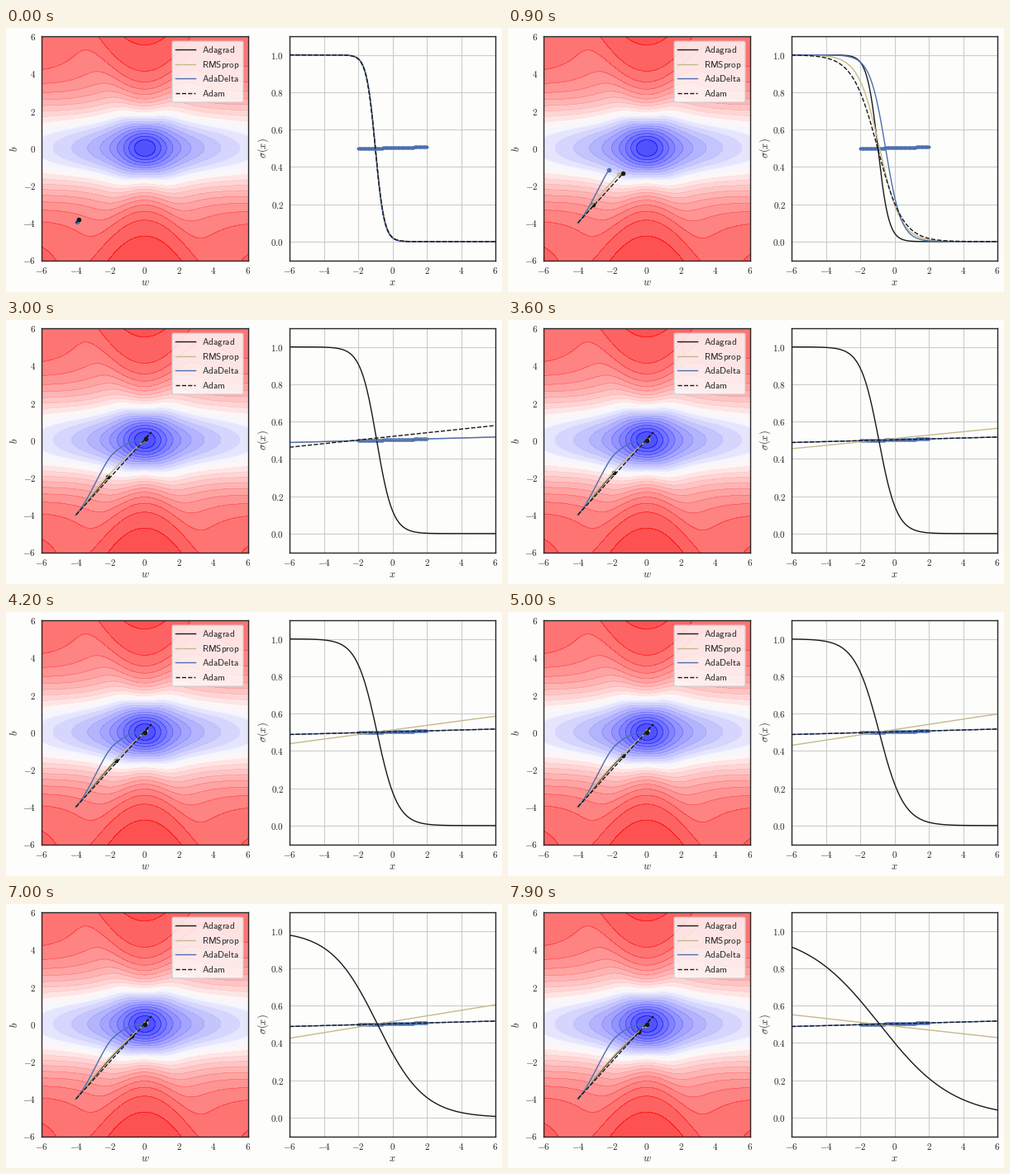
A matplotlib script for the animation above (8000 ms loop, 600 px wide and 320 px high).

```python
import numpy as np
import matplotlib.pyplot as plt
from matplotlib.animation import FuncAnimation
from matplotlib.patches import FancyBboxPatch

W, H, DPI = 600, 320, 100
FRAMES, STEP = 80, 100
START, W_OPT, B_OPT = -4, 0.0097, 0.01
BLACK, KHAKI, BLUE = "#181818", "#c5ba8a", "#4c6eb0"
BG, INK = "#fdfdfb", "#262626"

plt.rcParams.update({
    "mathtext.fontset": "cm", "font.size": 8, "axes.edgecolor": INK,
    "axes.linewidth": 1.0, "text.color": INK, "xtick.color": INK,
    "ytick.color": INK, "axes.facecolor": BG, "figure.facecolor": BG,
})


def sigmoid(z):
    return 1 / (1 + np.exp(-z))


def loss(w, b):
    """Mean squared error; most inputs sit near zero, the rest spread evenly."""
    def mse(xs):
        return sum((sigmoid(w * x + b) - sigmoid(W_OPT * x + B_OPT)) ** 2
                   for x in xs) / len(xs)
    return 0.6 * mse(np.linspace(-0.25, 0.25, 12)) + 0.4 * mse(np.linspace(-2, 2, 41))


# Parameter paths over the steps taken, k = 0 being the start
k = np.arange(FRAMES + 1)


def progress(steps, power):
    return np.minimum(k / steps, 1) ** power


def adagrad():
    w = START + 0.183 * k ** 0.676
    return w, w + 0.17 * np.sin(np.pi * w / START)


def rmsprop():
    p = progress(16, 1.1)
    # grows into a hop across the minimum on every step
    hop = np.where(k % 2, 1, -1) * 0.051 * (1 - np.exp(-np.maximum(k - 31, 0) / 8))
    w = W_OPT + (START - W_OPT) * (1 - p) + hop
    b = B_OPT + (START - B_OPT) * (1 - p) + hop
    return w, b + 0.22 * np.sin(np.pi * p)


def adadelta():
    p = progress(17, 1.5)
    bend = 1 + 1.2 * np.minimum(2 * p, 1)
    return (W_OPT + (START - W_OPT) * (1 - p),
            B_OPT + (START - B_OPT) * (1 - p) ** bend)


def adam():
    def overshoot(peak, goal, settle):
        rise = np.sin(np.pi / 2 * progress(22, 1)) ** 1.2
        back = np.clip((k - 22) / settle, 0, 1)
        ease = (1 - np.cos(np.pi * back)) / 2
        return START + (peak - START) * rise + (goal - peak) * ease
    return overshoot(0.38, W_OPT, 11), overshoot(0.42, B_OPT, 12.5)


RUNS = [("Adagrad", adagrad(), BLACK, "-"), ("RMSprop", rmsprop(), KHAKI, "-"),
        ("AdaDelta", adadelta(), BLUE, "-"), ("Adam", adam(), BLACK, "--")]

# Layout in pixels, y downwards
fig = plt.figure(figsize=(W / DPI, H / DPI), dpi=DPI)
TOP, BOTTOM = 10, 281.5


def panel(x0, x1, ylim, yticks, fmt):
    ax = fig.add_axes([x0 / W, 1 - BOTTOM / H, (x1 - x0) / W, (BOTTOM - TOP) / H])
    ax.set(xlim=(-6, 6), ylim=ylim)
    xticks = range(-6, 7, 2)
    ax.set_xticks(xticks, [f"${v}$" for v in xticks])
    ax.set_yticks(yticks, [f"${v:{fmt}}$" for v in yticks])
    ax.tick_params(axis="x", length=0, pad=5)
    ax.tick_params(axis="y", length=0, pad=5)
    return ax


left = panel(43, 292.5, (-6, 6), range(-6, 7, 2), "d")
right = panel(343, 592, (-0.1, 1.1), np.arange(6) / 5, ".1f")

over = fig.add_axes([0, 0, 1, 1])
over.set(xlim=(0, W), ylim=(H, 0))
over.axis("off")


def label(x, y, text, rot=0):
    over.text(x, y, text, size=9, rotation=rot, ha="center", va="center")


label(168, 309, "$w$")
label(11, 146, "$b$", 90)
label(467, 309, "$x$")
label(311, 146, r"$\sigma(x)$", 90)

# Loss surface
gw, gb = np.meshgrid(np.linspace(-6, 6, 161), np.linspace(-6, 6, 161))
surface = loss(gw, gb)
levels = np.arange(23) * 0.0116
left.contourf(gw, gb, surface, levels, cmap="bwr", alpha=0.7)
left.contour(gw, gb, surface, levels, cmap="bwr", alpha=0.6, linewidths=0.4)

# Data and model curves
right.set_axisbelow(True)
right.grid(color="#cccccc", lw=0.8)
data_x = np.linspace(-2, 2, 100)
right.scatter(data_x, sigmoid(W_OPT * data_x + B_OPT), s=8, color=BLUE, lw=0, zorder=1.5)

over.add_patch(FancyBboxPatch((203, 18), 82, 70, boxstyle="round,pad=2",
                              fc="white", ec="#cccccc", alpha=0.8))

xs = np.linspace(-6, 6, 300)
trails, dots, curves = [], [], []
for row, (name, path, color, ls) in enumerate(RUNS):
    style = dict(ls=ls, color=color, lw=1)
    trails += left.plot([], [], **style)
    dots += left.plot([], [], "o", color=color, ms=4, mew=0)
    curves += right.plot([], [], **style)
    y = 26 + 17.7 * row
    over.plot([205, 229], [y, y], **style)
    over.text(237, y + 4, rf"$\mathsf{{{name}}}$", size=8, va="baseline")


def update(i):
    for (_, (w, b), _, _), trail, dot, curve in zip(RUNS, trails, dots, curves):
        now = i + 1
        trail.set_data(w[:now + 1], b[:now + 1])
        dot.set_data([w[now]], [b[now]])
        curve.set_data(xs, sigmoid(w[now] * xs + b[now]))
    return trails + dots + curves


anim = FuncAnimation(fig, update, frames=FRAMES, interval=STEP, repeat=True,
                     repeat_delay=0, blit=False)
plt.show()
```
